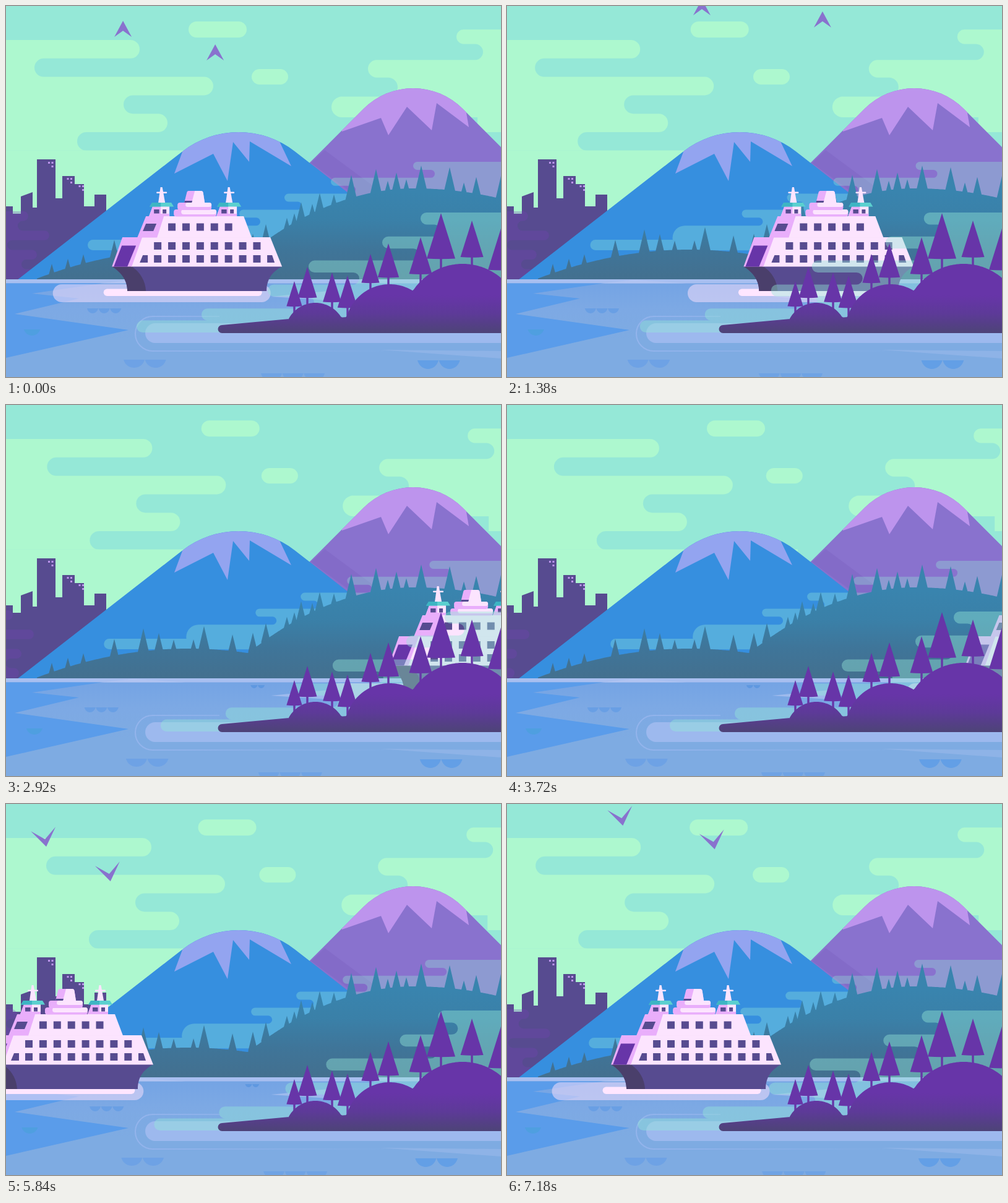
Write an HTML page that moves like this. It is 800x600 px and loops after 7200 ms.

```html
<!DOCTYPE html>
<html lang="en">
<head>
<meta charset="utf-8">
<title>Ferry in the bay</title>
<style>
html, body { margin: 0; width: 100%; height: 100%; overflow: hidden; background: #95e8d7; }
svg { display: block; width: 100vw; height: 100vh; }
</style>
</head>
<body>
<svg id="stage" viewBox="0 0 800 600" xmlns="http://www.w3.org/2000/svg"></svg>
<script>
const LOOP = 7200;
const TRAVEL = 1102;
const HORIZON = 442;
const C = {
  sky: '#95e8d7', cloud: '#adf8cf', city: '#574b90', violet: '#8972ce', lilac: '#bd94ed',
  blue: '#368fdf', snow: '#93a4f0', tree: '#6735a8', white: '#fce4fe', pink: '#e9aefb'
};

const path = (d, fill, more = '') => `<path d="${d}" fill="${fill}" ${more}/>`;
const poly = (pts, fill, more = '') => `<polygon points="${pts}" fill="${fill}" ${more}/>`;
const rect = (x, y, w, h, fill, r = 0) =>
  `<rect x="${x}" y="${y}" width="${w}" height="${h}" rx="${r}" fill="${fill}"/>`;
const grad = (id, y1, y2, ...colors) =>
  `<linearGradient id="${id}" gradientUnits="userSpaceOnUse" x1="0" x2="0" y1="${y1}" y2="${y2}">` +
  colors.map((c, i) => `<stop offset="${i / (colors.length - 1)}" stop-color="${c}"/>`).join('') +
  '</linearGradient>';

// Group that swings sideways once per loop; low is the time of its leftmost point
const drift = (amp, low, body) => `<g class="drift" data-amp="${amp}" data-low="${low}">${body}</g>`;

// Stack of round-ended rows, lobes and notches in turn. dir -1: lobes point left, 1: right.
function meander(dir, far, top, height, xs, grow = 0) {
  let y = top, d = `M${far} ${top}`;
  xs.forEach((x, i) => {
    const h = height + grow * i, r = h / 2, out = i % 2 ? -dir : dir;
    y += h;
    d += `H${x - out * r}A${r} ${r} 0 0 ${out > 0 ? 1 : 0} ${x - out * r} ${y}`;
  });
  return d + `H${far}Z`;
}

// Filled area under y = f(x)
function under(f, x0, x1, bottom) {
  let d = `M${x0} ${bottom}`;
  for (let x = x0; x <= x1; x += 2) d += `L${x} ${f(x).toFixed(1)}`;
  return d + `V${bottom}Z`;
}

function skyClouds() {
  const left = meander(1, -80, 55, 29.8, [216, 46, 335, 190, 261, 115]);
  const right = meander(-1, 900, 38, 23.4, [728, 771, 585, 633, 526], 2.5);
  return drift(18, 735, path(left, C.cloud) + rect(-80, 233.5, 520, 208, C.cloud)) +
    drift(15.5, 705, path(right, C.cloud) + rect(762, 179.5, 200, 24.5, C.cloud)) +
    drift(15.6, 580, rect(295, 25, 94, 26, C.cloud, 13)) +
    drift(12.3, 610, rect(397, 102, 59, 25, C.cloud, 12.5));
}

function city() {
  const lights = [[68, 252], [98.5, 278], [117.5, 290]].map(([x, y]) =>
    rect(x, y, 3, 3, C.lilac) + rect(x + 5.5, y, 3, 3, C.lilac) + rect(x + 5.5, y + 6, 3, 3, C.lilac));
  const fog = meander(1, -80, 332, 15.6, [36, 19, 70, 2, 50, 25, 46]);
  return path(`M0 ${HORIZON}V324H11V336H24V308L43 301V326H50V248H80V311H91V275H111V288H126V324H143V305H162V${HORIZON}Z`, C.city) +
    lights.join('') + drift(-18.8, 580, path(fog, '#7444b4', 'opacity=".3"'));
}

// Straight slopes joined by a round top
function peak(cx, top, r, slope, fill, id, snow, snowFill) {
  const a = slope * Math.PI / 180;
  const dx = r * Math.sin(a), y = top + r * (1 - Math.cos(a));
  const foot = dx + (HORIZON - y) / Math.tan(a);
  const d = `M${cx - foot} ${HORIZON}L${cx - dx} ${y}A${r} ${r} 0 0 1 ${cx + dx} ${y}L${cx + foot} ${HORIZON}Z`;
  return `<clipPath id="${id}"><path d="${d}"/></clipPath>` + path(d, fill) +
    poly(snow, snowFill, `clip-path="url(#${id})"`);
}

function mountains() {
  return peak(658, 133, 113, 45, C.violet, 'far',
      '543,203 543,120 744,120 744,173 748,196 696,157 688,201 648,163 618,209 606,181', C.lilac) +
    poly('493,254 515,233 600,296 570,310', '#7a5fbf', 'opacity=".4"') +
    peak(376, 204, 148, 37.9, C.blue, 'near',
      '272,271 285,236 285,190 442,190 442,219 461,259 394,219 393,252 367,220 358,283 335,239', C.snow);
}

function midFog() {
  const body = meander(-1, 900, 252, 12.9, [658, 693, 525, 565, 450, 478, 377, 411]);
  const foot = meander(-1, 900, 355.2, 40, [265]) + meander(-1, 600, 378, 17, [132]);
  return drift(19.4, 560, path(body + foot, C.sky, 'opacity=".33"'));
}

function forest() {
  const bow = (x, cx, top, k) => top + k * (x - cx) ** 2;
  const ridge = x => Math.min(bow(x, 295, 394, .00078), bow(x, 660, 295, x < 660 ? .00147 : .00085));
  const firs = {
    37: [222, 320, 558, 598, 671, 717, 800],
    27: [175, 247, 366, 399, 420, 477, 507, 631, 760],
    15: [74, 100, 125, 271, 303, 454, 466, 495, 530, 617, 647, 740]
  };
  let d = under(ridge, 50, 800, HORIZON);
  for (const h in firs) {
    for (const x of firs[h]) {
      const y = ridge(x), w = 2 + h * .2;
      d += `M${x} ${y - h}L${x + w} ${y + 3}V${y + 6}H${x - w}V${y + 3}Z`;
    }
  }
  return path(d, 'url(#gForest)');
}

// Bowl-shaped ripples hanging from a flat top
function bowls(x, y, w, h, n, fill) {
  let s = '';
  for (let i = 0; i < n; i++) {
    const a = x + i * (w + .6), low = y + h * 1.33;
    s += path(`M${a} ${y}h${w}C${a + w * .86} ${low} ${a + w * .14} ${low} ${a} ${y}Z`, fill);
  }
  return s;
}

function water() {
  return rect(0, HORIZON, 800, 600 - HORIZON, 'url(#gWater)') +
    rect(0, HORIZON, 800, 6.5, '#a8bff0') +
    path('M0 448.5H155L42 465L118 473L14 498L198 524L0 569Z', '#5a9cea') +
    poly('155,448.5 205,443 290,448.5', '#bac9f3', 'opacity=".6"') +
    poly('428,470 520,461 520,476', '#a8c0f0', 'opacity=".8"') +
    poly('605,556 800,558 800,570', '#9dbcee', 'opacity=".5"') +
    path('M345 502H237A28 28 0 0 0 237 558H640', 'none', 'stroke="url(#gRing)" stroke-width="2"') +
    path('M800 513H241A16 16 0 0 0 241 545H800Z', '#9db9ee') +
    drift(4.5, 5600, bowls(29, 523, 26, 10, 1, '#4f9fe0') + bowls(190, 572, 34, 13, 2, '#6ea2e5') +
      bowls(665, 573, 34, 14, 2, '#639fe6')) +
    drift(-5, 5600, bowls(131, 489, 18, 8, 3, '#699fe4') + bowls(412, 594, 34, 13, 3, '#6fa3e4')) +
    drift(13, 4800, bowls(401, 453, 11, 5, 2, '#5f98e0'));
}

function lookout(x) {
  return `<g transform="translate(${x})">` +
    poly('237,324 264,324 264,340 231,340', C.white) +
    poly('237,324 250,324 250,336 264,336 264,340 231,340', C.pink) +
    rect(239, 329, 8.5, 6.5, C.city) + rect(253, 329, 6, 6.5, C.city) +
    poly('236,318 267,318 271,324.5 232,324.5', '#5bd0cf') +
    poly('236,318 250,318 250,324.5 232,324.5', '#3db5c3') +
    poly('249.5,293 252.5,293 257,318 246,318', C.white) +
    rect(243, 300.5, 17, 2.5, C.white, 1) + '</g>';
}

function ship() {
  const pane = (i, y) => rect(239 + i * 22.9, y, 12, 12, C.city);
  let panes = '';
  for (let i = 0; i < 8; i++) {
    panes += pane(i, 382) + pane(i, 403);
    if (i > 0 && i < 6) panes += pane(i, 351.5);
  }
  return '<g class="wake">' + rect(75, 450, 352, 29, 'rgba(232,217,250,.6)', 14.5) +
    rect(157, 457.5, 256, 11.5, '#ffe6ff', 5.7) + '</g>' +
    path('M171 421H446C430 430 421 442 421 461H196C196 443 186 431 171 421Z', C.city) +
    path('M171 421H203C217 431 225 444 226 461H196C196 443 186 431 171 421Z', '#4a3f6b') +
    poly('218,374 427,374 446,421.5 202,421.5', C.white) +
    poly('188,374 220,374 203,421.5 171,421.5', C.pink) +
    poly('187,387.5 210,387.5 196,421.5 174,421.5', C.tree) +
    poly('253,340 384,340 397,374.5 243,374.5', C.white) +
    poly('226,340 255,340 244,374.5 212,374.5', C.pink) +
    poly('226,352 243,352 238,364 221,364', C.city) +
    panes +
    poly('221,403 229,403 229,415 216,415', C.city) +
    poly('422,403 430,403 434,415 422,415', C.city) +
    rect(271, 329, 69, 11.5, C.pink, 4) + rect(283, 329, 57, 8, C.white, 4) +
    rect(277, 318, 55, 12, C.pink, 4) + rect(290, 318, 42, 7, C.white, 3.5) +
    path('M295 299H315Q318 299 318.5 302L321 318H288L292 302Q292.5 299 295 299Z', C.pink) +
    path('M305 299H315Q318 299 318.5 302L321 318H300Z', C.white) +
    poly('288.7,315 301,315 300,318 288,318', C.city) +
    lookout(0) + lookout(109);
}

function nearFog() {
  const d = meander(-1, 900, 334, 19.4, [670, 702, 608, 668, 489, 571, 423, 498, 316]);
  const foot = meander(-1, 900, 508.6, 19.4, [211]);
  return drift(28.7, 560, path(d + foot, C.sky, 'opacity=".42"'));
}

function island() {
  const hills = [[500, 529, 49], [620, 522, 72], [738, 513, 96]];
  const dome = (x, [cx, cy, r]) => cy - Math.sqrt(Math.max(0, r * r - (x - cx) ** 2));
  const land = x => Math.min(506 - (x - 457) * .03, ...hills.map(h => dome(x, h)));
  const trees = [[466, 445], [487, 422], [527, 431], [552, 436], [589, 401], [618, 384],
    [670, 374], [703, 335], [753, 347], [803, 350]];
  const firs = trees.map(([x, top]) => {
    const h = land(x) - top, w = h * .26, base = top + h * .83;
    return path(`M${x} ${top}L${x + w} ${base}Q${x} ${base + 1.5} ${x - w} ${base}Z`, C.tree) +
      rect(x - 1.7, base, 3.4, h * .25, C.tree);
  });
  return firs.join('') +
    path('M349 529A6.5 6.5 0 0 1 349 516L458 506V529Z' + under(land, 457, 801, 529), 'url(#gLand)');
}

const stage = document.getElementById('stage');
stage.innerHTML = '<defs>' +
  grad('gForest', 300, 441, '#3984ae', '#3a80a8', '#3f7599', '#43708f') +
  grad('gWater', HORIZON, 540, '#73a3e4', '#7da9e4', '#7eabe2') +
  grad('gLand', 468, 527, C.tree, '#5d3a98', '#4e4379') +
  '<linearGradient id="gRing" gradientUnits="userSpaceOnUse" x1="209" x2="640" y1="0" y2="0">' +
  '<stop offset="0" stop-color="#93b4ec"/><stop offset="1" stop-color="#93b4ec" stop-opacity="0"/></linearGradient></defs>' +
  rect(0, 0, 800, 600, C.sky) + skyClouds() +
  path('', C.violet, 'class="bird"').repeat(2) +
  city() + mountains() + midFog() + forest() + water() +
  `<g class="ship">${ship()}</g>`.repeat(2) + nearFog() + island();

const all = name => [...stage.querySelectorAll('.' + name)];
const drifters = all('drift'), ships = all('ship'), wakes = all('wake'), birds = all('bird');
const shift = (node, x) => node.setAttribute('transform', `translate(${x.toFixed(2)} 0)`);
const wave = (t, peakTime, period = LOOP) => Math.cos(2 * Math.PI * (t - peakTime) / period);

// Start of each bird and its speed in px per ms
const flights = [[189, 24, .0912, -.0253], [338, 62, .1245, -.0386]];
const WING_UP = 'l14 26l-14 -10l-14 10z';
const WING_DOWN = 'm0 10.5l-25 -25l23 13l17 -20z';
const FLAP = 300;

function draw(t) {
  for (const node of drifters) {
    const { amp, low } = node.dataset;
    shift(node, amp * (wave(0, low) - wave(t, low)));
  }

  // The second ship enters on the left while the first leaves on the right
  ships.forEach((node, i) => shift(node, TRAVEL * (t / LOOP - i)));
  wakes.forEach(node => shift(node, 2.8 + 2.8 * wave(t, 1440, LOOP / 2)));

  const air = t < LOOP / 2 ? t : t - LOOP;
  const wing = Math.floor(t / FLAP) % 2 ? WING_DOWN : WING_UP;
  birds.forEach((node, i) => {
    const [x, y, vx, vy] = flights[i];
    node.setAttribute('d', `M${(x + vx * air).toFixed(2)} ${(y + vy * air).toFixed(2)}${wing}`);
  });
}

function tick() {
  draw(performance.now() % LOOP);
  requestAnimationFrame(tick);
}
tick();
</script>
</body>
</html>
```
